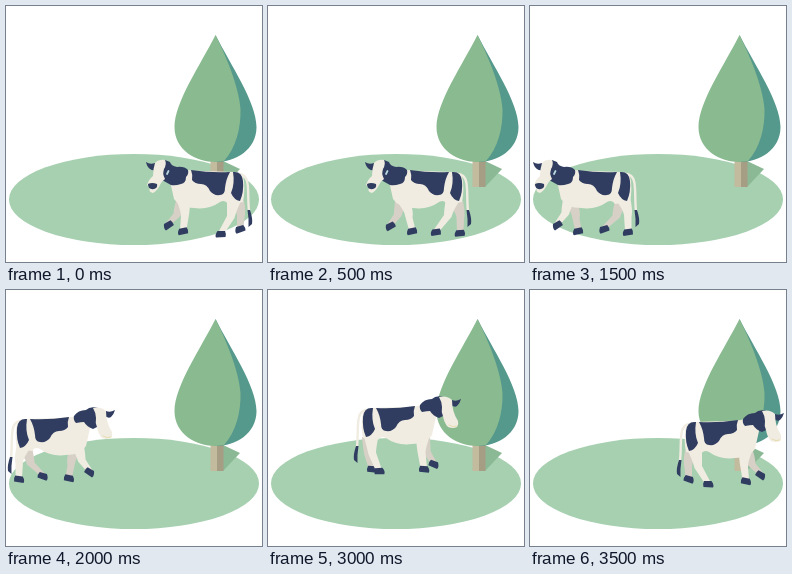
Write an HTML page with a canvas that moves like this. It is 256 px wide and 256 px high and loops after 4000 ms.

```html
<!DOCTYPE html>
<html lang="en">
<head>
<meta charset="utf-8">
<title>Grazing cow</title>
<style>
html, body { margin: 0; width: 100%; height: 100%; overflow: hidden; background: #fff; }
canvas { display: block; width: 100vw; height: 100vh; }
</style>
</head>
<body>
<canvas id="stage" width="256" height="256"></canvas>
<script>
const ctx = document.getElementById('stage').getContext('2d');
const STEP = 500;
const NAVY = '#303c60', CREAM = '#f0ece1', SHADE = '#d7d0c6';

function fill(d, color) {
  ctx.fillStyle = color;
  ctx.fill(new Path2D(d));
}

function line(d, color, width) {
  ctx.strokeStyle = color;
  ctx.lineWidth = width;
  ctx.lineCap = 'round';
  ctx.stroke(new Path2D(d));
}

// Feet: near front, far front, near hind, far hind
const GAIT = {
  stand:  [[38, 71], [23, 65], [76, 74], [95, 69]],
  push:   [[48, 71], [26, 66], [72, 72], [96, 73]],
  swing:  [[24, 66], [38, 66], [92, 73], [79, 73]],
  reach:  [[25, 65], [46, 71], [96, 72], [72, 69]],
  pass:   [[31, 70], [38, 67], [91, 73], [79, 71]],
  gather: [[37, 73], [27, 68], [82, 75], [89, 73]]
};
const HIPS = [[38, 40], [38, 42], [90, 38], [91, 42]];

// x is the muzzle-side edge; dir -1 faces right
const WALK = [
  { x: 139, y: 153, dir: 1, gait: 'stand' },
  { x: 96, y: 153, dir: 1, gait: 'push' },
  { x: 51, y: 153, dir: 1, gait: 'swing' },
  { x: 2, y: 153, dir: 1, gait: 'reach' },
  { x: 109, y: 116, dir: -1, gait: 'reach' },
  { x: 151, y: 102, dir: -1, gait: 'pass' },
  { x: 193, y: 105, dir: -1, gait: 'gather' },
  { x: 254, y: 119, dir: -1, gait: 'stand' }
];

function leg(index, [fx, fy], color) {
  const [hx, hy] = HIPS[index];
  const hind = index > 1;
  const kx = (hx + fx) / 2 + (hind ? 3 : 2);
  const ky = (hy + fy) / 2 + 1;
  const top = hind ? 8 : 7;
  fill(`M${hx - top} ${hy} Q${kx - 4} ${ky - 4} ${kx - 4} ${ky}
    L${fx - 3} ${fy} L${fx + 3.5} ${fy} L${kx + 3.5} ${ky + 2}
    Q${kx + 5} ${ky - 5} ${hx + top} ${hy}Z`, color);
  ctx.save();
  ctx.translate(fx, fy);
  ctx.rotate((fy - 74) * 0.06);
  fill('M-3.5 -2 L4 -2 Q5.5 1 4.5 4 L-5 4.5 Q-6.5 2 -3.5 -2Z', NAVY);
  ctx.restore();
}

function leftHead() {
  fill(`M20 1 L25 3 Q26 7 32 8 Q39 7 43 11 Q44 15 41 18
    Q41 24 36 25 Q30 27 26 26 L17 21Z`, NAVY);
  fill('M1 3 Q5 6 10 4 L13 9 Q9 13 5 10 Q2 8 1 3Z', NAVY);
  fill(`M10 4 Q14 0 20 1 Q22 5 19 10 Q17 14 20 20 Q17 22 15 26
    Q12 32 8 34 Q3 33 5 29 L2 26 Q4 20 8 17 Q8 10 10 4Z`, CREAM);
  fill('M3 25 Q7 23 12 25 Q13 29 9 30 Q3 31 3 25Z', NAVY);
  line('M22 15 L23.5 12', '#b9d9df', 1.8);
}

function rightHead() {
  fill(`M17 2 Q25 0 29 4 Q37 4 41 10 Q42 14 39 17 Q34 16 31 16
    Q28 21 22 23 L16 20Z`, NAVY);
  fill('M0 4 Q5 7 9 5 L11 9 Q7 13 4 11 Q1 8 0 4Z', NAVY);
  fill(`M9 5 Q14 0 22 2 Q19 7 19 12 Q20 17 18 21 Q17 28 13 32
    Q8 34 4 32 Q2 29 3 26 Q9 17 9 5Z`, CREAM);
  line('M4 31 Q8 33 12 30', '#e8dcae', 1);
}

function cow({ x, y, dir, gait }) {
  const feet = GAIT[gait];
  ctx.save();
  ctx.translate(x, y);
  ctx.scale(dir, 1);

  leg(1, feet[1], SHADE);
  leg(3, feet[3], SHADE);
  line('M95 15 C106 17 102 33 104 52', CREAM, 2.4);
  fill('M102.5 51 L105 51 Q108 60 107 65 L103.5 68 Q104 60 102.5 51Z', NAVY);
  leg(0, feet[0], CREAM);
  leg(2, feet[2], CREAM);

  fill(`M25 16 Q34 7 43 11 Q49 12 58 12 L90 13 Q98 13 99 22
    Q100 34 98 43 L83 45 Q80 40 75 43 Q64 51 49 49
    Q35 49 29 40 Q27 31 25 22Z`, CREAM);
  fill(`M46 11 Q66 14 85 13 Q81 20 80 29 Q80 36 75 36
    Q69 37 65 32 Q62 25 56 25 Q50 25 47 21 Q48 16 46 11Z`, NAVY);
  fill(`M88 13 Q97 12 98 22 Q99 33 95 42 Q89 41 86 34
    Q90 25 88 13Z`, NAVY);

  if (dir > 0) leftHead();
  else rightHead();
  ctx.restore();
}

function scenery() {
  ctx.fillStyle = '#fff';
  ctx.fillRect(0, 0, 256, 256);
  ctx.fillStyle = '#a6d0b0';
  ctx.beginPath();
  ctx.ellipse(128, 193.5, 125, 45.5, 0, 0, Math.PI * 2);
  ctx.fill();
  fill('M217 155 L234 163 L217 181Z', '#8bb895');
  fill('M204.5 150 H211 V181 H204.5Z', '#c3bb9e');
  fill('M211 150 H217.5 V181 H211Z', '#a69d85');
  fill(`M209.5 29 C224 58 250.5 96 250.5 121
    C250.5 144 229 156 210 156Z`, '#55988c');
  fill(`M209.5 29 C195 58 168.5 96 168.5 121 C168.5 144 190 156 209.5 156
    L218 155 C230 142 235 122 234.5 103 C233 80 219 48 209.5 29Z`, '#8aba90');
}

function render(now) {
  scenery();
  cow(WALK[Math.floor(now / STEP) % WALK.length]);
}

let start;
function tick(now) {
  start ??= now;
  render(now - start);
  requestAnimationFrame(tick);
}
render(0);
requestAnimationFrame(tick);
</script>
</body>
</html>
```
